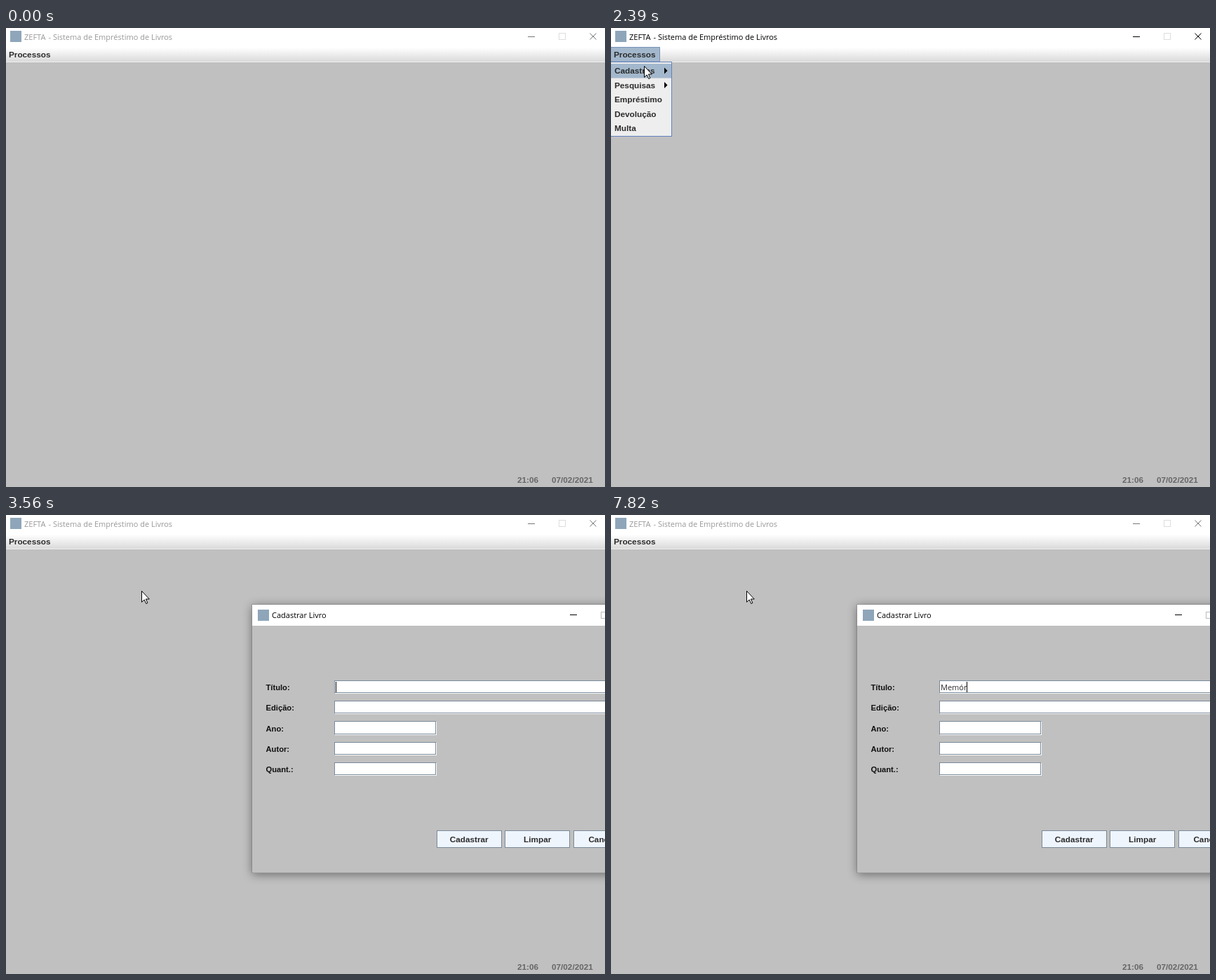
An HTML page for the animation above (7990 ms loop, 854 by 655 pixels).

```html
<!DOCTYPE html>
<html lang="pt">
<head>
<meta charset="utf-8">
<title>Sistema de Empréstimo de Livros</title>
<style>
  html, body { margin: 0; height: 100%; overflow: hidden; background: #c0c0c0; }
  svg { display: block; width: 100vw; height: 100vh; }
  text { font: bold 11.75px "Liberation Sans", Arial, sans-serif; fill: #2b2b2b; white-space: pre; }
  .caption, .caption text, .typed { font: 11px "Open Sans", "Noto Sans", sans-serif; }
  .label { font-size: 11.2px; fill: #111; }
  .clock { fill: #666; }
  .icon { fill: #8fa6ba; }
  .line { fill: none; stroke: currentColor; }
  #mainCaption { color: #777; }
  #mainCaption text { fill: #999; }
  #mainCaption.active { color: #000; }
  #mainCaption.active text { fill: #000; }
  #window { filter: drop-shadow(0 2px 7px rgba(0, 0, 0, .45)); }
  .popup { fill: #eee; stroke: #6382bf; }
  .selected { fill: #a3b8cc; }
</style>
</head>
<body>
<svg viewBox="0 0 854 655">
  <defs>
    <linearGradient id="bar" x2="0" y2="1">
      <stop stop-color="#fff"/><stop offset="1" stop-color="#dadada"/>
    </linearGradient>
  </defs>
  <rect width="854" height="655" fill="#c0c0c0"/>
  <rect width="854" height="28" fill="#fff"/>
  <rect y="28" width="854" height="20" fill="url(#bar)"/>
  <rect y="48" width="854" height="1" fill="#eee"/>
  <g id="mainCaption" class="caption">
    <rect class="icon" x="6" y="4" width="16" height="16"/>
    <text x="26" y="17">ZEFTA</text>
    <text x="60.5" y="17">- Sistema de Empréstimo de Livros</text>
    <path class="line" d="M744 12.5h10M832.5 7.5l9 9m0-9l-9 9"/>
    <rect x="788.5" y="7.5" width="9" height="9" fill="none" stroke="#ddd"/>
  </g>
  <text class="clock" x="729" y="649">21:06</text>
  <text class="clock" x="778" y="649">07/02/2021</text>

  <rect id="menuButton" class="selected" x="-.5" y="27.5" width="70" height="20.5" stroke="#7a93b8"/>
  <text x="4" y="42">Processos</text>
  <g id="menu"></g>
  <g id="submenu"></g>

  <g id="dialog">
    <g id="window">
      <rect x="351" y="128" width="560" height="383" fill="#c0c0c0"/>
      <rect x="351" y="128" width="560" height="30" fill="#fff"/>
    </g>
    <path d="M860 127.5H350.5V510.5H860" fill="none" stroke="#707070" stroke-opacity=".4"/>
    <g class="caption">
      <rect class="icon" x="359" y="135" width="16" height="16"/>
      <text x="379" y="147" style="fill:#000">Cadastrar Livro</text>
      <path class="line" d="M804 142.5h10"/>
      <rect x="848.5" y="138.5" width="9" height="9" fill="none" stroke="#bbb"/>
    </g>
    <g id="form"></g>
    <text id="typed" class="typed" x="470" y="250"></text>
    <rect id="caret" y="238" width="1" height="15"/>
  </g>
  <path id="cursor" fill="#fff" stroke="#000"
        d="M.5 .5V16.3L4.2 12.9 6.8 18.5 8.9 17.5 6.4 12H11.3Z"/>
</svg>
<script>
const LOOP = 7990, TICK = 75, BLINK = 500;
const MENU_TOP = 51, ROW = 20.5;
const el = id => document.getElementById(id);
const show = (id, on) => { el(id).style.display = on ? '' : 'none'; };

function buildMenu(id, left, right, items, arrows) {
  const rows = items.map((name, i) => {
    const y = MENU_TOP + i * ROW;
    const arrow = i < arrows ? `<path d="M${right - 10} ${y + 5.5}l4.5 4.5-4.5 4.5z"/>` : '';
    return `<rect class="selected" x="${left}" y="${y}" width="${right - left}" height="${ROW}"/>
      <text x="${left + 5}" y="${y + 14.2}">${name}</text>${arrow}`;
  });
  el(id).innerHTML = `<rect class="popup" x="${left - .5}" y="48.5" width="${right - left + 1}"
    height="${items.length * ROW + 3.5}"/>` + rows.join('');
}
buildMenu('menu', 0, 86, ['Cadastros', 'Pesquisas', 'Empréstimo', 'Devolução', 'Multa'], 2);
buildMenu('submenu', 87, 152, ['Aluno', 'Livro', 'Usuário'], 0);

const rowAt = y => Math.floor((y - MENU_TOP) / ROW);
function selectRow(id, row) {
  el(id).querySelectorAll('.selected').forEach((rect, i) => {
    rect.style.display = i === row ? '' : 'none';
  });
}

const fields = ['Título:', 'Edição:', 'Ano:', 'Autor:', 'Quant.:'].map((name, i) => {
  const y = 235.9 + i * 29.28, width = i < 2 ? 400 : 145;
  const top = Math.round(y), height = Math.floor(y + 17.6) - top;
  return `<text class="label" x="370.5" y="${y + 14.2}">${name}</text>
    <rect x="469" y="${top + 1}" width="${width}" height="${height + 1}" fill="#fff"/>
    <rect x="468.5" y="${top + .5}" width="${width - 1}" height="${height}" fill="#fff" stroke="#7a8a99"/>`;
});
const buttons = ['Cadastrar', 'Limpar', 'Cancelar'].map((name, i) => {
  const x = 614.4 + i * 97.5;
  return `<rect x="${Math.floor(x) + .5}" y="450.5" width="92" height="24" fill="#eff5fd" stroke="#7a8a99"/>
    <text x="${x + 45.8}" y="467" text-anchor="middle">${name}</text>`;
});
el('form').innerHTML = fields.concat(buttons).join('');

// Eased progress, advancing in whole ticks like a screen recording
function glide(t, start, steps) {
  const done = Math.floor((t - start) / TICK) + 1;
  const p = Math.min(Math.max(done / steps, 0), 1);
  return 1 - (1 - p) ** 3;
}

// Pointer moves: start time, ticks, destination
const moves = [
  [70, 8, 33, 52], [760, 3, 27, 19], [1080, 3, 28, 33], [1780, 6, 48, 73],
  [2310, 2, 47, 54], [2790, 3, 118, 82], [3330, 2, 193, 108]
];
function pointerAt(t) {
  let x = 1157, y = 924;
  for (const [start, steps, toX, toY] of moves) {
    const p = glide(t, start, steps);
    x += (toX - x) * p;
    y += (toY - y) * p;
  }
  return [Math.round(x), Math.round(y)];
}

// The first entry is the moment the field gets focus
const keyTimes = [3290, 5490, 5960, 6110, 7670, 7820];

function draw(t) {
  const [x, y] = pointerAt(t);
  el('cursor').setAttribute('transform', `translate(${x} ${y})`);

  const menuOpen = t >= 1630 && t < 3170, submenuOpen = menuOpen && t >= 2540;
  el('mainCaption').classList.toggle('active', t >= 1540 && t < 3170);
  show('menuButton', menuOpen);
  show('menu', menuOpen);
  show('submenu', submenuOpen);
  selectRow('menu', submenuOpen ? 0 : rowAt(y));
  selectRow('submenu', x >= 87 ? rowAt(y) : -1);

  const opening = glide(t, 3330, 4);
  show('dialog', opening > 0);
  el('dialog').setAttribute('opacity', opening ** 2);
  el('dialog').setAttribute('transform',
    `translate(613 315) scale(${1 - .086 * (1 - opening)}) translate(-613 -315)`);

  const pressed = keyTimes.filter(time => time <= t);
  const typed = el('typed');
  typed.textContent = 'Memór'.slice(0, Math.max(pressed.length - 1, 0));
  const width = typed.textContent ? typed.getComputedTextLength() : 0;
  el('caret').setAttribute('x', Math.floor(470 + width));
  show('caret', Math.floor((t - pressed.at(-1)) / BLINK) % 2 === 0);
}

function tick() {
  draw(performance.now() % LOOP);
  requestAnimationFrame(tick);
}
tick();
</script>
</body>
</html>
```
